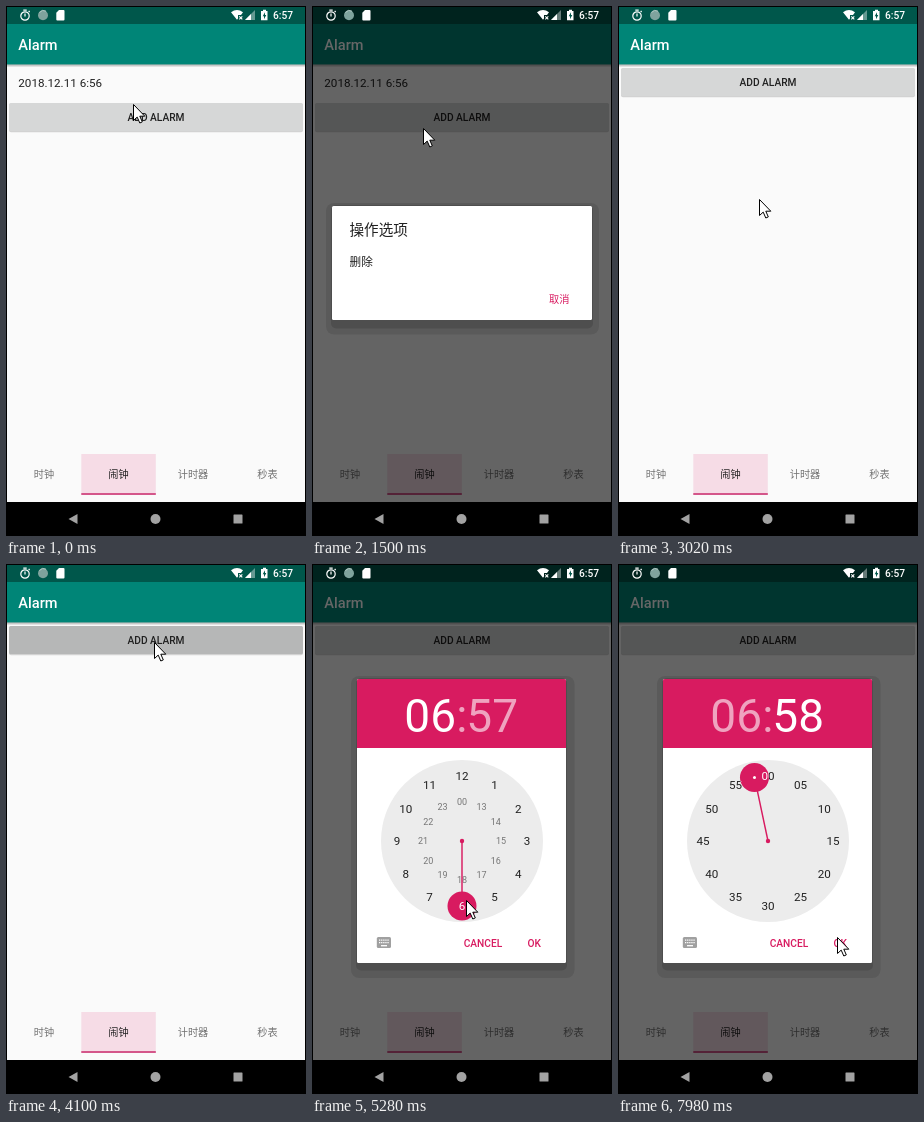
Write an HTML page that moves like this. It is 300 px wide and 530 px high and loops after 8 s.

```html
<!DOCTYPE html>
<html lang="zh-CN">
<head>
<meta charset="utf-8">
<title>Alarm</title>
<style>
html, body { margin: 0; width: 100%; height: 100%; overflow: hidden; background: #000; }
svg { display: block; width: 300px; height: 530px; }
text { font-family: Roboto, "Noto Sans CJK SC", "Noto Sans CJK", sans-serif; fill: #212121; }
.mid { text-anchor: middle; }
.btn { font-size: 10.2px; font-weight: 500; }
.pink { fill: #d81b60; }
.tab { font-size: 10.2px; fill: #737373; }
.big { font-size: 46px; fill: #fff; }
.num { font-size: 11.65px; text-anchor: middle; }
.num.in { font-size: 9px; fill: #757575; }
.on text { fill: #fff; }
</style>
</head>
<body>
<svg viewBox="0 0 300 530">
  <defs>
    <linearGradient id="shade" x2="0" y2="1">
      <stop offset="0" stop-opacity=".3"/><stop offset="1" stop-opacity="0"/>
    </linearGradient>
  </defs>

  <rect x="1" y="1" width="298" height="495" fill="#fafafa"/>
  <g id="row">
    <rect id="rowPress" x="2" y="59" width="295" height="34" fill-opacity=".12"/>
    <text x="12.3" y="80.5" font-size="11.65">2018.12.11 6:56</text>
  </g>
  <g id="add">
    <rect x="3" y="98" width="294" height="28.3" rx="2" fill-opacity=".16"/>
    <rect x="3" y="97" width="294" height="28" rx="1.5" fill="#d6d7d7"/>
    <rect id="addPress" x="3" y="97" width="294" height="28" rx="1.5"/>
    <text class="btn mid" x="150" y="114.7">ADD ALARM</text>
  </g>
  <rect x="1" y="1" width="298" height="17.5" fill="#00574b"/>
  <rect x="1" y="18" width="298" height="40.5" fill="#008577"/>
  <rect x="1" y="58.5" width="298" height="3" fill="url(#shade)"/>
  <text x="12.3" y="43.7" font-size="14.6" font-weight="500" style="fill:#fff">Alarm</text>

  <rect x="75.3" y="448" width="74.5" height="41" fill="#f6dce6"/>
  <rect x="75.3" y="487" width="74.5" height="2" fill="#d4568a"/>
  <text class="tab mid" x="38" y="472">时钟</text>
  <text class="tab mid" x="112.5" y="472" style="fill:#212121">闹钟</text>
  <text class="tab mid" x="187" y="472">计时器</text>
  <text class="tab mid" x="261.5" y="472">秒表</text>

  <rect id="dim" x="1" y="1" width="298" height="495"/>

  <g id="menu">
    <rect x="14" y="197" width="273" height="131.5" rx="8" fill-opacity=".1"/>
    <rect x="19" y="199" width="262" height="123.5" rx="5" fill-opacity=".13"/>
    <rect x="20" y="200" width="260" height="114" rx="1.5" fill="#fff"/>
    <rect id="itemPress" x="20" y="238" width="260" height="35" fill="#eee"/>
    <text x="37.5" y="228.5" font-size="14.6">操作选项</text>
    <text x="37.5" y="260.4" font-size="11.65">删除</text>
    <text class="btn pink" x="237" y="297" style="font-weight:400">取消</text>
  </g>

  <g id="picker">
    <rect x="39" y="112" width="223.5" height="302" rx="8" fill-opacity=".1"/>
    <rect x="44" y="114" width="211" height="292.5" rx="5" fill-opacity=".13"/>
    <rect x="45" y="115" width="209" height="284" rx="1.5" fill="#fff"/>
    <path class="pink" d="M45 184v-67.500q0-1.500 1.500-1.500h206q1.500 0 1.500 1.500v67.500z"/>
    <text id="hh" class="big" x="144" y="167.500" text-anchor="end">06</text>
    <text class="big mid" x="149.800" y="167.500" fill-opacity=".6">:</text>
    <text id="mm" class="big" x="154.300" y="167.500">57</text>
    <circle cx="150" cy="277" r="81" fill="#ececec"/>
    <g id="dials"></g>
    <rect x="64.800" y="373" width="14.200" height="11" rx="1.500" fill="#a0a0a0"/>
    <path d="M67 376.200h10M67 378.700h10" stroke="#fff" stroke-width="1.300" stroke-dasharray="1.300 .8"/>
    <path d="M69 381.700h6" stroke="#fff" stroke-width="1.300"/>
    <text class="btn pink mid" x="171" y="382.700">CANCEL</text>
    <text class="btn pink mid" x="222.300" y="382.700">OK</text>
  </g>

  <g fill="#fff">
    <circle cx="19" cy="10" r="4.200" fill="none" stroke="#fff" stroke-width="1.200"/>
    <path d="M17.300 3.500h3.400v1.300h-3.400zM18.400 7.500h1.200v3h-1.200zM22.200 5.300l.9-.8 1 1-.9.9z"/>
    <circle cx="37" cy="9.200" r="5" fill="#7fa39d"/>
    <path d="M33.500 6.500a5 5 0 0 1 6.500-1.300" fill="none" stroke="#b5cbc7"/>
    <path d="M53 4h4.500q1 0 1 1v8.500q0 1-1 1h-6.200q-1 0-1-1v-6.700z"/>
    <path d="M225 6.300q6-4.600 12 0l-2 2.700h-3v3.400l-1 1.300z"/>
    <path d="M233.300 10.300l3 3m0-3l-3 3" stroke="#fff" stroke-width="1.100"/>
    <path d="M249 4v10h-10z" fill-opacity=".4"/>
    <path d="M245 8v6h-6z"/>
    <path d="M257 3.800h3v1.200h1.500v9.300h-6.500v-9.300h2z"/>
    <path d="M259 6.200l-2.300 4h1.300v3l2.300-4.200h-1.300z" fill="#00574b"/>
    <text x="267" y="13" class="btn" style="fill:#fff">6:57</text>
  </g>

  <rect y="496" width="300" height="34"/>
  <g fill="#a2a2a2">
    <path d="M62.500 513l9-5v10z"/>
    <circle cx="149.500" cy="513" r="5"/>
    <rect x="227.500" y="508.500" width="9" height="9" rx=".6"/>
  </g>
  <path id="mouse" d="M.5.5v16l3.700-3.400 2.600 5.900 2.500-1.100-2.500-5.700h5z"
    fill="#fff" stroke="#000" stroke-linejoin="round"/>
</svg>
<script>
const LOOP = 8000, CX = 150, CY = 277, R = 65, R_IN = 39;
const $ = id => document.getElementById(id);
const set = (el, attrs) => { for (const k in attrs) el.setAttribute(k, attrs[k]); };
const polar = (deg, r) => {
  const a = deg * Math.PI / 180;
  return [CX + r * Math.sin(a), CY - r * Math.cos(a)];
};
const pad = n => String(n).padStart(2, '0');

// Each entry holds until the next: [time, ...values]
const mouse = [
  [0, 127, 98], [120, 116, 89], [240, 105, 83],
  [1380, 107, 97], [1500, 111, 122], [1650, 117, 160], [1800, 123, 200],
  [1920, 128, 230], [2050, 132, 250], [2170, 135, 259], [2320, 103, 253],
  [2870, 125, 222], [3020, 141, 193], [3140, 143, 155], [3290, 145, 120],
  [3410, 147, 98], [3540, 148, 84], [3680, 148, 78],
  [4220, 152, 100], [4340, 160, 165], [4460, 171, 241], [4610, 166, 285],
  [4730, 161, 314], [4850, 157, 329], [5000, 155, 334], [5130, 154, 336],
  [5430, 146, 331], [5560, 108, 312], [5700, 71, 292], [5830, 82, 277],
  [5970, 98, 264], [6130, 112, 240], [6260, 124, 222], [6400, 130, 215],
  [6990, 133, 214], [7140, 136, 213],
  [7670, 168, 270], [7810, 203, 340], [7960, 219, 373]
];
const dim = [[0, 0], [1230, .08], [1380, .5], [1500, .6], [2870, .3], [3020, 0],
  [4460, .11], [4610, .5], [4730, .6]];
const menu = [[0, 0], [1230, .5], [1380, 1], [2870, .4], [3020, 0]];
const picker = [[0, 0], [4460, .75], [4610, 1]];
const addPress = [[0, 0], [3950, .08], [4100, .15], [4340, .1], [4460, .06], [4610, .03], [4730, 0]];
const minuteMode = [[0, 0], [5430, .35], [5560, .8], [5700, 1]];
const minute = [[0, 57], [6990, 58]];

function at(table, t) {
  let v = table[0];
  for (const step of table) if (step[0] <= t) v = step;
  return v.slice(1);
}

function label(text, deg, inner) {
  const [x, y] = polar(deg, inner ? R_IN : R);
  return `<text class="num${inner ? ' in' : ''}" x="${x}" y="${y + (inner ? 3.2 : 4.2)}">${text}</text>`;
}

function dial(id, labels) {
  $('dials').innerHTML += `<g id="${id}">
    <clipPath id="${id}Clip"><circle r="14.5"/></clipPath>${labels}
    <g class="pink"><circle cx="${CX}" cy="${CY}" r="2.2"/>
    <line x1="${CX}" y1="${CY}" stroke="#d81b60" stroke-width="1.45"/><circle class="knob" r="14.5"/></g>
    <g class="on" clip-path="url(#${id}Clip)">${labels}</g><circle class="dot" r="1.5" fill="#fff"/></g>`;
}

function point(id, deg) {
  const [x, y] = polar(deg, R), g = $(id);
  g.querySelectorAll('clipPath circle, .knob, .dot').forEach(c => set(c, { cx: x, cy: y }));
  set(g.querySelector('line'), { x2: x, y2: y });
  set(g.querySelector('.dot'), { opacity: deg % 30 ? 1 : 0 });
}

let hours = '', minutes = '';
for (let i = 0; i < 12; i++) {
  hours += label(i || 12, i * 30) + label(i ? i + 12 : '00', i * 30, true);
  minutes += label(pad(i * 5), i * 30);
}
dial('hourDial', hours);
dial('minuteDial', minutes);
point('hourDial', 180);

function show(id, opacity) {
  set($(id), { opacity, visibility: opacity ? 'visible' : 'hidden' });
}

function draw(t) {
  const [x, y] = at(mouse, t), [mode] = at(minuteMode, t), [min] = at(minute, t);
  set($('mouse'), { transform: `translate(${x} ${y})` });
  show('row', t < 2870 ? 1 : 0);
  set($('rowPress'), { opacity: t >= 670 && t < 1230 ? 1 : 0 });
  set($('add'), { transform: `translate(0 ${t < 2870 ? 0 : -35})` });
  set($('addPress'), { opacity: at(addPress, t)[0] });
  show('dim', at(dim, t)[0]);
  show('menu', at(menu, t)[0]);
  set($('itemPress'), { opacity: t >= 2720 ? 1 : 0 });
  show('picker', at(picker, t)[0]);
  set($('hourDial'), { opacity: 1 - mode });
  set($('minuteDial'), { opacity: mode });
  set($('hh'), { 'fill-opacity': mode ? .6 : 1 });
  set($('mm'), { 'fill-opacity': mode ? 1 : .6 });
  $('mm').textContent = min;
  point('minuteDial', min * 6);
}

const start = performance.now();
function tick() {
  draw((performance.now() - start) % LOOP);
  requestAnimationFrame(tick);
}
tick();
</script>
</body>
</html>
```
